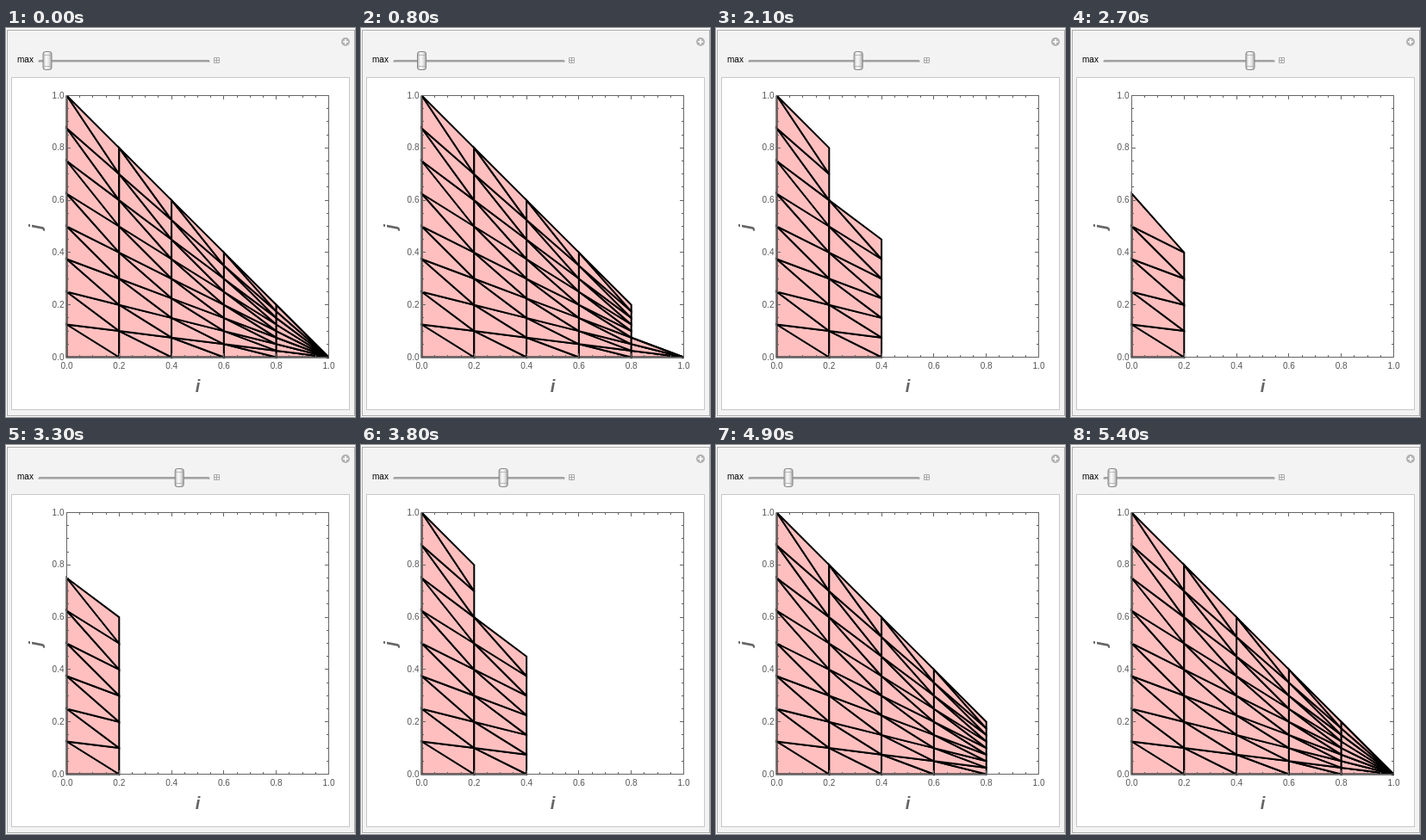
Write an HTML page that moves like this. It is 405 px wide and 452 px high and loops after 6 s.

```html
<!DOCTYPE html>
<html>
<head>
<meta charset="utf-8">
<style>
  html, body { margin: 0; width: 100%; height: 100%; overflow: hidden; background: #fff; }
  svg { display: block; font: 10px "Liberation Sans", Arial, sans-serif; }
  .axis { font: italic bold 20px "Liberation Sans", Arial, sans-serif; fill: #666; text-anchor: middle; }
  #mesh { fill: #ffbfbf; stroke: #000; stroke-width: 2; stroke-miterlimit: 3.25; }
  #frame { fill: none; stroke: #666; }
  #labels { fill: #555; }
</style>
</head>
<body>
<svg width="405" height="452" viewBox="0 0 405 452">
  <defs>
    <linearGradient id="metal">
      <stop offset="0" stop-color="#b4b4b4"/>
      <stop offset=".35" stop-color="#fafafa"/>
      <stop offset=".65" stop-color="#e6e6e6"/>
      <stop offset="1" stop-color="#a8a8a8"/>
    </linearGradient>
  </defs>
  <rect x="1.5" y="2.5" width="403" height="448" fill="#f3f3f3" stroke="#aaa"/>
  <rect x="6.5" y="57.5" width="392" height="386" fill="#fff" stroke="#c8c8c8"/>
  <circle cx="394" cy="16" r="5" fill="#b2b2b2"/>
  <path d="M391 16h6M394 13v6" stroke="#fff" stroke-width="1.6"/>
  <text x="13" y="40">max</text>
  <rect x="37.5" y="37" width="199" height="3" rx="1.5" fill="#a2a2a2"/>
  <path d="M39 39.5h196" stroke="#c4c4c4"/>
  <path d="M241.5 34.5h6v6h-6zM242 37.5h5M244.5 35v5" fill="none" stroke="#aaa"/>
  <g id="thumb">
    <rect x="-5" y="27.5" width="10" height="21" rx="2.5" fill="url(#metal)" stroke="#858585"/>
    <path d="M-4.5 31.5h9M-4.5 44.5h9" stroke="#a5a5a5" stroke-opacity=".7"/>
  </g>
  <g id="mesh"></g>
  <path id="frame"/>
  <g id="labels"></g>
  <text class="axis" x="222.5" y="423">i</text>
  <text class="axis" transform="translate(41 231) rotate(-90)">j</text>
</svg>
<script>
const LEFT = 70.5, BOTTOM = 382.5, SIZE = 304, COLS = 5, ROWS = 8;
const $ = id => document.getElementById(id);
const px = x => LEFT + SIZE * x;
const py = y => BOTTOM - SIZE * y;

function add(parent, tag, attrs, text = '') {
  const node = document.createElementNS('http://www.w3.org/2000/svg', tag);
  for (const key in attrs) node.setAttribute(key, attrs[key]);
  node.textContent = text;
  parent.append(node);
  return node;
}

// Triangulated right triangle: each cell is split along its falling diagonal
const vertex = (col, row) => [px(col / COLS), py((1 - col / COLS) * row / ROWS)];
const triangles = [];
for (let c = 0; c < COLS; c++) {
  for (let r = 0; r < ROWS; r++) {
    const low = vertex(c + 1, r), high = vertex(c, r + 1);
    for (const corner of [vertex(c, r), vertex(c + 1, r + 1)]) {
      triangles.push(add($('mesh'), 'polygon', { points: [low, corner, high].join(' ') }));
    }
  }
}

let frame = `M${LEFT} ${BOTTOM}h${SIZE}v${-SIZE}h${-SIZE}z`;
for (let k = 0; k <= 20; k++) {
  const v = k / 20, major = k % 4 === 0, len = major ? 4.5 : 2.5;
  const x = Math.floor(px(v)) + .5, y = Math.floor(py(v)) + .5;
  frame += `M${x} ${BOTTOM}v${-len}M${x} ${BOTTOM - SIZE}v${len}`
         + `M${LEFT} ${y}h${len}M${LEFT + SIZE} ${y}h${-len}`;
  if (major) {
    add($('labels'), 'text', { x: px(v), y: 395.5, 'text-anchor': 'middle' }, v.toFixed(1));
    add($('labels'), 'text', { x: 67.5, y: py(v) + 3, 'text-anchor': 'end' }, v.toFixed(1));
  }
}
$('frame').setAttribute('d', frame);

// 100 ms steps down and back up, resting at the full mesh
function draw(now) {
  const t = now % 6000;
  const tick = Math.floor((t - 500) / 100);
  const step = Math.max(0, Math.min(tick, 49 - tick));
  const count = Math.round(80 - 79 * 2 * step / 49);
  triangles.forEach((tri, i) => tri.style.display = i < count ? '' : 'none');
  $('thumb').setAttribute('transform', `translate(${48 + 178 * (80 - count) / 79} 0)`);
  requestAnimationFrame(draw);
}
draw(performance.now());
</script>
</body>
</html>
```
